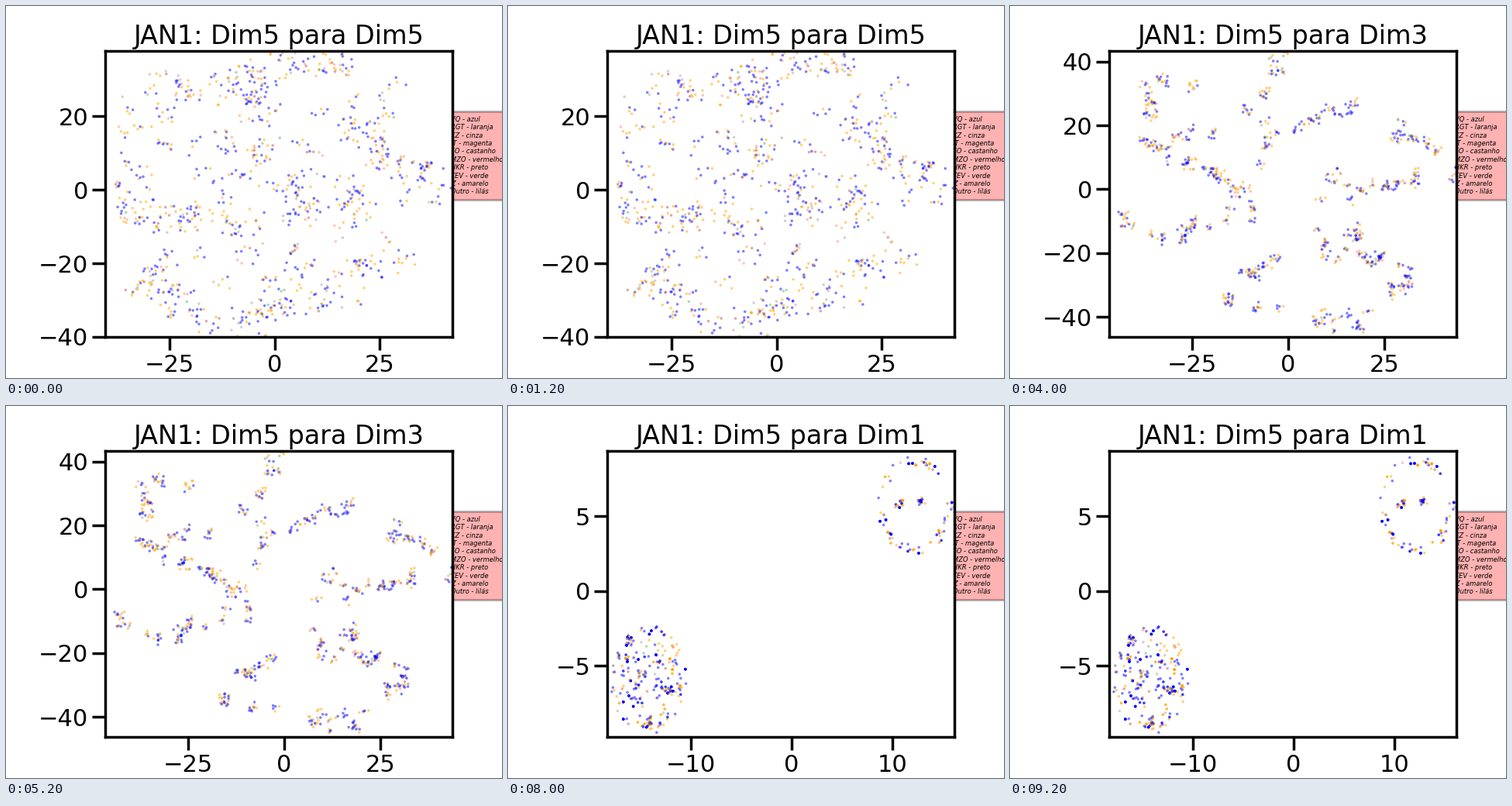
Write a matplotlib script that moves like this. It is 640x480 px and loops after 10000 ms.

```python
import numpy as np
import matplotlib.pyplot as plt
from matplotlib.animation import FuncAnimation
from matplotlib.colors import to_rgba_array
from matplotlib.ticker import MultipleLocator

plt.rcParams["font.family"] = "DejaVu Sans"

LEFT, TOP, WIDTH, HEIGHT = 128, 57.6, 448, 369.6  # axes in pixels
TINTS = to_rgba_array(["blue", "orange", "gray", "salmon", "brown", "green"])
TINTS[:, 3] = [.5, .5, .35, .45, .4, .3]
ODDS = [.49, .34, .06, .05, .04, .02]

LEGEND = """VQ - azul
RGT - laranja
KZ - cinza
JT - magenta
FO - castanho
MZO - vermelho
HKR - preto
TEV - verde
Z - amarelo
Outro - lilás"""

# Each tuple is the spine of one strand of points: x, y, x, y ...
DIM5 = [
    (200, 95, 275, 115, 350, 72, 460, 80, 500, 122),
    (440, 120, 475, 190, 562, 245), (300, 90, 345, 165),
    (155, 135, 145, 235, 240, 270, 310, 265),
    (385, 195, 392, 275), (450, 220, 458, 285),
    (205, 300, 190, 360, 265, 415, 400, 365, 515, 320)]

DIM4 = [
    (230, 110, 265, 80, 390, 70), (385, 112, 450, 104, 514, 138),
    (160, 175, 330, 155), (355, 170, 405, 165, 410, 205, 470, 262),
    (465, 165, 575, 158), (212, 235, 285, 260),
    (148, 238, 140, 285, 240, 378), (230, 415, 300, 365, 388, 385),
    (335, 315, 385, 250, 405, 340), (440, 340, 490, 310),
    (570, 225, 520, 250, 550, 300)]

DIM3 = [
    (250, 92, 185, 100, 182, 148), (265, 168, 170, 175, 240, 205, 345, 265),
    (135, 270, 195, 295, 325, 262), (355, 64, 310, 140), (340, 150, 335, 205),
    (365, 157, 458, 122), (492, 165, 545, 180, 575, 238),
    (420, 205, 420, 245, 550, 215), (455, 260, 437, 310),
    (405, 290, 405, 330), (302, 350, 360, 332, 505, 320),
    (525, 338, 468, 390), (285, 385, 350, 385), (380, 410, 485, 403)]

DIM2 = [
    (164, 257, 137, 225, 132, 175, 158, 121, 203, 83, 245, 84, 266, 113,
     268, 165, 263, 240, 270, 313, 305, 372, 375, 412, 460, 427),
    (441, 167, 480, 202, 498, 250, 475, 292, 425, 295, 384, 254, 367, 190,
     369, 115, 388, 72, 431, 58),
    (450, 63, 500, 95, 548, 142, 576, 195)]

DIM1 = [(532, 123), (507, 125), (158, 302), (172, 345), (207, 368), (180, 409)]

# strands, points, spread, x limits, y limits, tick steps
PANELS = [
    (DIM5, 700, 13, (-40.35, 42.3), (-40.05, 37.8), (25, 20)),
    (DIM4, 830, 9, (-41.7, 44.15), (-42.9, 39.2), (25, 20)),
    (DIM3, 920, 6, (-46.6, 43.75), (-46.3, 43.4), (25, 20)),
    (DIM2, 1150, .35, (-58.2, 53.2), (-59.8, 38.5), (50, 20)),
    (DIM1, 80, 3, (-18.3, 16.15), (-9.77, 9.39), (10, 5))]


def smooth(p, steps=12):
    """Catmull-Rom curve through the points p."""
    q = np.vstack([2 * p[0] - p[1], p, 2 * p[-1] - p[-2]])
    a, b, c, d = (q[i:len(q) - 3 + i, None] for i in range(4))
    t = (np.arange(steps) / steps)[None, :, None]
    s = 2 * b + (c - a) * t + (2 * a - 5 * b + 4 * c - d) * t**2 \
        + (3 * b - a - 3 * c + d) * t**3
    return np.vstack([s.reshape(-1, 2) / 2, p[-1:]])


def clump(rng, xy, spread, size=5):
    """Turn every point into a small loose group."""
    xy = xy.repeat(size, 0)
    return xy + rng.normal(0, spread, xy.shape)


def strew(rng, strands, total, spread):
    """Scatter points along all strands, shared out by length."""
    lines = [np.reshape(s, (-1, 2)).astype(float) for s in strands]
    lines = [smooth(p) if len(p) > 2 else p for p in lines]
    runs = [np.r_[0, np.hypot(*np.diff(p, axis=0).T).cumsum()] for p in lines]
    share = np.array([r[-1] + spread for r in runs])
    size = 5 if spread > 4 else 1
    counts = np.rint(total / size * share / share.sum()).astype(int)
    out = []
    for p, r, n in zip(lines, runs, counts):
        u = rng.uniform(0, r[-1], n)
        xy = np.c_[np.interp(u, r, p[:, 0]), np.interp(u, r, p[:, 1])]
        out.append(xy + rng.normal(0, spread, xy.shape))
    xy = np.vstack(out)
    return clump(rng, xy, spread / 2) if size > 1 else xy


def oval(rng, n, cx, cy, rx, ry, inner):
    t = rng.uniform(0, 2 * np.pi, n)
    r = np.sqrt(rng.uniform(inner**2, 1, n))
    return np.c_[cx + rx * r * np.cos(t), cy + ry * r * np.sin(t)]


def build(k):
    strands, total, spread, (x0, x1), (y0, y1), _ = PANELS[k]
    rng = np.random.default_rng(40 + k)
    xy = strew(rng, strands, total, spread)
    if k < 2:
        loose = oval(rng, 60 - 40 * k, 350, 245, 205, 165, 0)
        xy = np.vstack([xy, clump(rng, loose, 7)])
    if k == 4:
        xy = np.vstack([xy, oval(rng, 65, 525, 128, 49, 64, .8),
                        oval(rng, 170, 181, 354, 50, 71, .2)])
    tint = rng.choice(len(TINTS), len(xy), p=ODDS)
    if k == 4:  # coinciding points add up to stronger dots
        copies = rng.choice([1, 2, 6], len(xy), p=[.65, .2, .15])
        xy, tint = xy.repeat(copies, 0), tint.repeat(copies)
    xy = np.c_[x0 + (xy[:, 0] - LEFT) / WIDTH * (x1 - x0),
               y1 - (xy[:, 1] - TOP) / HEIGHT * (y1 - y0)]
    return xy, TINTS[tint]


CLOUDS = [build(k) for k in range(len(PANELS))]

fig, ax = plt.subplots(figsize=(6.4, 4.8), dpi=100)
fig.subplots_adjust(left=.2, right=.9, top=.88, bottom=.11)
ax.tick_params(length=12, width=2.5, pad=3.5, labelsize=22)
for spine in ax.spines.values():
    spine.set_linewidth(2.5)
fig.text(574 / 640, 1 - 193.2 / 480, LEGEND, size=6, style="italic",
         va="center", zorder=-1,
         bbox=dict(facecolor="red", alpha=.3, linewidth=2))
dots = ax.scatter([], [], s=6.5, linewidths=0)


def draw(k):
    xlim, ylim, (dx, dy) = PANELS[k][3:]
    xy, rgba = CLOUDS[k]
    dots.set_offsets(xy)
    dots.set_facecolors(rgba)
    ax.set(xlim=xlim, ylim=ylim)
    ax.xaxis.set_major_locator(MultipleLocator(dx))
    ax.yaxis.set_major_locator(MultipleLocator(dy))
    ax.set_title(f"JAN1: Dim5 para Dim{5 - k}", size=24)
    return dots,


anim = FuncAnimation(fig, draw, frames=len(PANELS), interval=2000,
                     repeat=True, repeat_delay=0)
plt.show()
```
